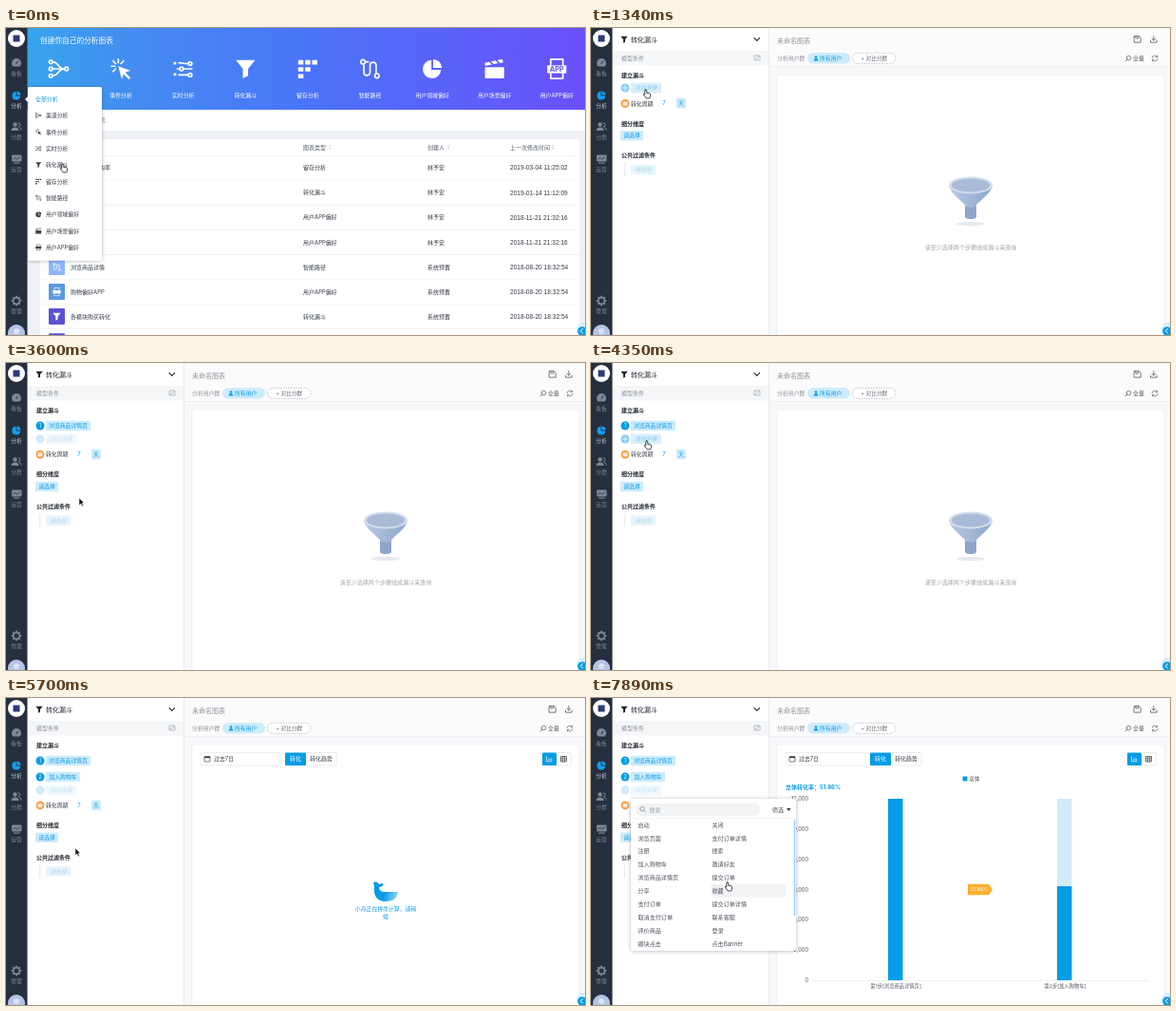
Animation, 610 px wide and 323 px high, one loop 8000 ms. Source, as an HTML page with a canvas:

```html
<!DOCTYPE html>
<html lang="zh-CN">
<head>
<meta charset="utf-8">
<title>转化漏斗</title>
<style>
html,body{margin:0;width:100%;height:100%;overflow:hidden;background:#fff}
canvas{display:block;width:610px;height:323px}
</style>
</head>
<body>
<canvas id="stage"></canvas>
<script>
const W = 610, H = 323, LOOP = 8000;
const BLUE = '#079ce6', CHIP = '#cdebfc', INK = '#333a44', GREY = '#8c929b';
const canvas = document.getElementById('stage');
const g = canvas.getContext('2d');
const dpr = Math.max(1, window.devicePixelRatio || 1);
canvas.width = W * dpr;
canvas.height = H * dpr;

const clamp = v => Math.max(0, Math.min(1, v));
const ramp = (t, a, b) => clamp((t - a) / (b - a));
const ease = u => u * u * (3 - 2 * u);

function text(s, x, y, color = INK, size = 6, style = '', align = 'left', latin = 'Inter') {
  g.font = `${style} ${size}px ${latin}, "Noto Sans CJK SC", "Noto Sans CJK", sans-serif`;
  g.textAlign = align;
  g.fillStyle = color;
  g.fillText(s, x, y + size * .37);
}
function rect(x, y, w, h, fill, r = 0, stroke) {
  g.beginPath();
  g.roundRect(x, y, w, h, r);
  if (fill) { g.fillStyle = fill; g.fill(); }
  if (stroke) { g.strokeStyle = stroke; g.lineWidth = .7; g.stroke(); }
}
function disc(x, y, r, fill) {
  g.beginPath();
  g.arc(x, y, r, 0, 7);
  g.fillStyle = fill;
  g.fill();
}
function path(d, x, y, scale, fill, stroke, lw = 1) {
  const p = new Path2D(d);
  g.save();
  g.translate(x, y);
  g.scale(scale, scale);
  g.lineWidth = lw;
  g.lineCap = g.lineJoin = 'round';
  if (fill) { g.fillStyle = fill; g.fill(p); }
  if (stroke) { g.strokeStyle = stroke; g.stroke(p); }
  g.restore();
}
function faded(alpha, draw) {
  if (alpha <= 0) return;
  g.save();
  g.globalAlpha *= alpha;
  draw();
  g.restore();
}
// White panel; its shadow is kept outside so that it stays clean while fading
function panel(x, y, w, h) {
  g.save();
  g.beginPath();
  g.rect(0, 0, W, H);
  g.roundRect(x, y, w, h, 2);
  g.clip('evenodd');
  g.shadowColor = 'rgba(40,55,80,.38)';
  g.shadowBlur = 4 * dpr;
  g.shadowOffsetY = .6 * dpr;
  rect(x, y, w, h, '#fff', 2);
  g.restore();
  rect(x, y, w, h, '#fff', 2);
}

const ring = (x, y, r) => `M${x - r} ${y}a${r} ${r} 0 1 0 ${2 * r} 0a${r} ${r} 0 1 0 ${-2 * r} 0`;

// Icons on a 24 grid: [fill path, stroke path]
const ICONS = {
  channel: ['', ring(3, 4, 2) + ring(3, 12, 2) + ring(3, 20, 2) + ring(21, 12, 2) + 'M5 4c7 0 6 8 14 8M5 20c7 0 6-8 14-8M5 12h14'],
  event: ['M9 9l14 5-6 2 6 6-2 2-6-6-2 6z', 'M9 1v4M1 9h4M3 3l3 3M15 3l-3 3M3 15l3-3'],
  live: ['M1 4h3v3H1zM1 17h3v3H1z', ring(20, 6, 2) + ring(20, 19, 2) + ring(10, 12, 2) + 'M7 5c5 0 4 1 11 1M12 12h10M7 19h11M5 12h3'],
  funnel: ['M1 2h22l-8 10v8l-6 3V12z', ''],
  retain: ['M1 2h6v5H1zM9 2h6v5H9zM17 2h6v5h-6zM1 10h6v5H1zM9 10h6v5H9zM1 18h6v5H1z', ''],
  route: ['', ring(4, 4, 2.500) + ring(20, 20, 2.500) + 'M5 7v9a3.500 3.500 0 0 0 7 0V8a3.500 3.500 0 0 1 7 0v9M7 4h3'],
  pie: ['M11 2a10.5 10.5 0 1 0 11 11H11zM13 1a10 10 0 0 1 10 10H13z', ''],
  clap: ['M1 10h22v13H1zM1 5l5-1 3 3-8 1.500zM8 3.500l5-1 3 3-5 1zM15 2l6-1 1 3.500-4 .8z', ''],
  app: ['M1 8h22v9H1z', 'M5 8V1h14v7M5 17v6h14v-6']
};
function icon(name, cx, cy, size, color) {
  const [f, s] = ICONS[name], k = size / 24;
  const x = cx - size / 2, y = cy - size / 2;
  path(f, x, y, k, color);
  if (s) path(s, x, y, k, null, color, 1.8);
}

const MODELS = [
  ['channel', '渠道分析'], ['event', '事件分析'], ['live', '实时分析'],
  ['funnel', '转化漏斗'], ['retain', '留存分析'], ['route', '智能路径'],
  ['pie', '用户领域偏好'], ['clap', '用户场景偏好'], ['app', '用户APP偏好']
];
const OWNER = '林予安', PRESET = '系统预置';
const CHARTS = [
  ['首页商品加购率', 'retain', '留存分析', OWNER, '2019-03-04 11:25:02', '#55a5ee'],
  ['购买转化', 'funnel', '转化漏斗', OWNER, '2019-01-14 11:12:09', '#5b52d4'],
  ['应用偏好', 'app', '用户APP偏好', OWNER, '2018-11-21 21:32:16', '#4d90df'],
  ['应用偏好', 'app', '用户APP偏好', OWNER, '2018-11-21 21:32:16', '#4d90df'],
  ['浏览商品详情', 'route', '智能路径', PRESET, '2018-08-20 18:32:54', '#8fb6fa'],
  ['购物偏好APP', 'app', '用户APP偏好', PRESET, '2018-08-20 18:32:54', '#5b9ae2'],
  ['各模块购买转化', 'funnel', '转化漏斗', PRESET, '2018-08-20 18:32:54', '#5b52d4'],
  ['注册转化', 'funnel', '转化漏斗', PRESET, '2018-08-20 18:32:54', '#5b52d4']
];
const EVENTS = [
  ['启动', '关闭'], ['浏览页面', '支付订单详情'], ['注册', '搜索'], ['加入购物车', '邀请好友'],
  ['浏览商品详情页', '提交订单'], ['分享', '收藏'], ['支付订单', '提交订单详情'],
  ['取消支付订单', '联系客服'], ['评价商品', '登录'], ['模块点击', '点击Banner']
];

function sidebar() {
  const back = '#252f3d', grey = '#7d8795';
  rect(0, 0, 22.5, H, back);
  disc(11, 11, 9, '#fff');
  rect(7.5, 7.5, 7, 7, '#2b3a78');
  path('M1.500 9a5 5 0 1 1 7 0z', 6, 31.500, 1, grey);
  path('M5 6l1.500-2.500', 6, 31.500, 1, null, back, 1);
  icon('pie', 11, 71, 10, '#139ff0');
  disc(9.500, 101.500, 2.2, grey);
  path('M0 4a4 3.500 0 0 1 8 0z', 5.500, 104, 1, grey);
  path('M0 0a2 2 0 0 1 0 4M1 5c2 0 2 1.500 2 2.500', 13, 99.800, 1, null, grey, 1);
  rect(6, 133.500, 10.5, 7, grey, 1);
  path('M2 4l2-1.500 2 1.500 3-2', 5.500, 134, 1, null, back, .8);
  rect(8, 141.500, 6.5, 1.2, grey);
  g.save();
  g.translate(11, 287);
  for (let i = 0; i < 8; i++) { g.rotate(Math.PI / 4); rect(-1, -5.200, 2, 2, grey); }
  g.beginPath();
  g.arc(0, 0, 3.2, 0, 7);
  g.strokeStyle = grey; g.lineWidth = 1.4; g.stroke();
  g.restore();
  [['看板', 48], ['分析', 82], ['分群', 115], ['运营', 149], ['管理', 298]].forEach(([s, y]) =>
    text(s, 11, y, s === '分析' ? '#c9d2dc' : grey, 5.7, '', 'center'));
  disc(11, 321, 9, '#b4c4e6');
  disc(11, 319, 3, '#dbe4f5');
}

function helpTab() {
  disc(608, 317, 7.5, '#e3f2fc');
  disc(607, 319, 4.8, BLUE);
  path('M3 0L0 2.500 3 5', 605, 316.500, .9, null, '#fff', 1);
  text('…', 605, 310, BLUE, 5);
}

function sorter(x, y) {
  path('M0 2h3L1.500 0zM0 3.500h3L1.500 5.500z', x, y - 2.7, .8, '#c5cad2');
}

function home() {
  rect(22, 0, 588, H, '#eef1f5');
  const sky = g.createLinearGradient(22, 0, W, 0);
  [[0, '#37a5ee'], [.2, '#458bf1'], [.5, '#4a74f8'], [1, '#6a50fa']].forEach(s => sky.addColorStop(...s));
  rect(22, 0, 588, 86, sky);
  text('创建你自己的分析图表', 36, 13, '#fff', 7.7);
  MODELS.forEach(([name, label], i) => {
    const x = 55.500 + i * 65.6;
    icon(name, x, 43, 22, '#fff');
    if (name === 'app') text('APP', x, 43.500, '#5f58f8', 7.5, 'bold', 'center');
    text(label, x, 70.500, '#fff', 5.9, '', 'center');
  });
  rect(22, 86, 588, 22, '#fff');
  text('我的图表', 81, 97, GREY);
  rect(36, 117, 568, H, '#fff');
  [['图表类型', 313, 340], ['创建人', 444, 465], ['上一次修改时间', 531, 575]].forEach(([s, x, sx]) => {
    text(s, x, 126, '#555c66');
    sorter(sx, 126);
  });
  rect(36, 134.500, 568, .6, '#eceef2');
  CHARTS.forEach(([name, ic, type, who, date, color], i) => {
    const y = 147 + i * 26.1;
    rect(36, y + 13, 568, .6, '#eceef2');
    rect(45, y - 8.500, 17, 17, color, 1);
    icon(ic, 53.500, y, 9, '#fff');
    text(name, 68, y);
    text(type, 313, y);
    text(who, 444, y);
    text(date, 531, y, INK, 6.6, '', 'left', '"Liberation Sans"');
  });
  panel(23, 62, 78, 182.5);
  text('全部分析', 31, 75, BLUE, 5.9);
  MODELS.forEach(([name, label], i) => {
    const y = 92 + i * 17.36;
    icon(name, 34.200, y, 6.5, '#3a414c');
    text(label, 42, y, INK, 5.85);
  });
}

function chip(s, x, y, w, color = BLUE, style = '') {
  rect(x, y - 5.2, w, 10.4, CHIP, 1);
  text(s, x + w / 2, y, color, 5.85, style, 'center');
}
function badge(s, y) {
  disc(36, y, 4.5, BLUE);
  text(s, 36, y, '#fff', 5.5, '', 'center');
}

function builder(steps, hover) {
  rect(22.500, 0, 165, H, '#fff');
  icon('funnel', 35, 12, 8, '#1f252e');
  text('转化漏斗', 42, 12, '#222831', 7);
  path('M0 0l2.800 2.800L5.600 0', 172, 10.5, 1, null, '#333', 1.1);
  rect(22.500, 24, 165, 15.500, '#f5f6f8');
  text('模型条件', 32, 31.500, GREY);
  rect(172, 29, 6, 5, null, .5, '#9aa1ab');
  path('M0 3l4-3', 173, 30, 1, null, '#9aa1ab', .7);
  const head = (s, y) => text(s, 32, y, '#20262e', 6, 'bold');
  head('建立漏斗', 50);
  ['浏览商品详情页', '加入购物车'].slice(0, steps).forEach((s, i) => {
    const y = 66 + i * 17;
    badge(i + 1, y);
    chip(s, 42, y, i ? 36 : 47);
  });
  const ay = 63 + steps * 17, d = steps * 16.7;
  faded(.35 + .6 * hover, () => {
    disc(36, ay, 4.5, '#6bc0f0');
    path('M0 2.500h5M2.500 0v5', 33.500, ay - 2.500, 1, null, '#fff', .9);
    chip('添加步骤', 42, ay, 32, hover > .8 ? '#0a8fd6' : '#7fbfe4', 'italic');
  });
  disc(36, 79.500 + d, 4.5, '#f5a14a');
  rect(34, 78 + d, 4, 3.2, '#fde6cc', .5, '#fff');
  text('转化周期', 42, 79.500 + d, INK, 5.85);
  text('7', 77, 79 + d, BLUE, 6, '', 'center');
  chip('天', 90, 79.300 + d, 10);
  head('细分维度', 100.500 + d);
  chip('请选择', 31, 113.300 + d, 24);
  head('公共过滤条件', 134 + d);
  rect(35.5, 142 + d, .7, 14, '#d5d9df');
  faded(.5, () => chip('请选择', 42, 149 + d, 26, '#7fb9dc', 'italic'));
  rect(187, 0, .8, H, '#e1e4e9');
}

function frameHead() {
  rect(187, 0, 423, H, '#f7f8f9');
  rect(187, 0, 423, 40, '#fbfbfc');
  rect(187, 40, 423, .6, '#e8eaee');
  text('未命名图表', 196, 13, GREY, 7);
  path('M0 0h5l2 2v5H0zM1.500 0v2.500h3V0', 572.500, 8.500, .95, null, '#4a515b', .8);
  path('M3.500 0v4.500M1.500 2.800l2 2 2-2M0 5v2h7V5', 589.500, 8.500, .95, null, '#4a515b', .8);
  text('分析用户群', 196, 32, GREY, 5.9);
  rect(228, 26, 45, 11.500, CHIP, 5.7);
  disc(237, 30.500, 1.3, BLUE);
  path('M0 3a3 3 0 0 1 6 0z', 234.600, 32, .8, BLUE);
  text('所有用户', 241, 32, BLUE, 5.85);
  g.save();
  g.setLineDash([1.5, 1.2]);
  rect(275.500, 26.300, 45.500, 11, '#fff', 5.5, '#a5acb6');
  g.restore();
  text('+ 对比分群', 298.200, 32, '#666d77', 5.7, '', 'center');
  path(ring(4, 2.500, 2.300) + 'M2.300 4.200L.5 6', 562.500, 29, 1, null, '#555', .7);
  text('全量', 571, 32.200, '#555c66', 5.9);
  path('M0 2.500a3 3 0 0 1 5.500-1M5.500 0v1.700H4M6 3.500a3 3 0 0 1-5.500 1M.5 6V4.300H2', 591, 29, 1, null, '#666', .7);
  rect(196, 49, 408, H, '#fff', 1, '#eceef1');
}

function emptyState() {
  g.beginPath();
  g.ellipse(400, 206, 15, 2.2, 0, 0, 7);
  g.fillStyle = '#e6e9ee';
  g.fill();
  const cone = g.createLinearGradient(377, 0, 423, 0);
  cone.addColorStop(0, '#b9c9e2');
  cone.addColorStop(1, '#8da6cc');
  path('M377 165c1 8 9 13 17 21v13c2 2.500 10 2.500 12 0v-13c8-8 16-13 17-21z', 0, 0, 1, cone);
  path('M394 187c3 2 9 2 12 0v12c-2 2.500-10 2.500-12 0z', 0, 0, 1, '#8ea5cc');
  [[23, 9, '#d3dcea'], [20, 7, '#a9bbd7']].forEach(([rx, ry, c]) => {
    g.beginPath();
    g.ellipse(400, 165.500, rx, ry, 0, 0, 7);
    g.fillStyle = c;
    g.fill();
  });
  text('请至少选择两个步骤组成漏斗来查询', 400, 230.500, '#a0a5ad', 6.05, '', 'center');
}

function toolbar() {
  rect(205, 57.500, 84, 13.500, '#fff', 1, '#e3e6ea');
  rect(209, 61.500, 6, 5.5, null, .5, '#444');
  rect(209, 61.500, 6, 1.7, '#444');
  text('过去7日', 219, 64.300, INK, 5.9);
  rect(316, 57.500, 32, 13.500, '#fff', 1, '#dfe3e8');
  rect(294, 57.500, 22, 13.500, BLUE, 1);
  text('转化', 305, 64.300, '#fff', 5.9, '', 'center');
  text('转化趋势', 332, 64.300, INK, 5.9, '', 'center');
  rect(580, 57.500, 15, 13.500, '#fff', 1, '#dfe3e8');
  rect(565, 57.500, 15, 13.500, BLUE, 1);
  path('M0 0v5.500h6M2 4V3M3.700 4V2M5.400 4V2.500', 569.500, 61.500, .95, null, '#fff', .7);
  rect(584.500, 61.500, 6, 5.5, null, 0, '#444');
  path('M0 1.700h6M0 3.600h6M2 0v5.500M4 0v5.500', 584.500, 61.500, 1, null, '#444', .6);
}

function loading() {
  const skin = g.createLinearGradient(392, 206, 413, 210);
  skin.addColorStop(.3, BLUE);
  skin.addColorStop(1, '#9ad6f6');
  path('M387 194c3-1 5 0 6 2 2-1 4-1 5 0-1 2-3 3-5 3 0 4 3 5 7 5h13c0 6-5 10-13 10-9 0-13-6-12-15z', 0, 0, 1, skin);
  text('小舟正在拼命计算，请稍', 400, 221.500, BLUE, 5.85, '', 'center');
  text('候', 400, 230, BLUE, 5.85, '', 'center');
}

function chart(t) {
  const base = 297, full = 191, u = ramp(t, 7300, 7880), p = u * (2 - u);
  rect(391.500, 82.500, 5, 5, BLUE, 1);
  text('总体', 398.500, 85, '#444b55', 5.5);
  text('总体转化率：51.86%', 205, 94, BLUE, 6, 'bold');
  for (let i = 0; i <= 6; i++)
    text((i * 2000).toLocaleString('en-US'), 229, base - i * full / 6, '#555c66', 5.7, '', 'right');
  rect(232, base, 355, .6, '#dfe3e8');
  const bar = (x, part, fill) => rect(x, base - full * part * p, 15.500, full * part * p, fill);
  bar(313, 1, BLUE);
  bar(491, 1, '#d4eaf6');
  bar(491, .5186, BLUE);
  text('第1步[浏览商品详情页]', 321, 303, '#555c66', 5.3, '', 'center');
  text('第2步[加入购物车]', 499.500, 303, '#555c66', 5.3, '', 'center');
  if (t > 7600) {
    path('M0 0h22l4 5.700-4 5.700H0z', 397, 195.800, 1, '#f9b02c');
    text('51.86%', 409, 201.500, '#fff', 5.2, '', 'center');
  }
}

function menu(n, alpha, tip) {
  const y0 = 73 + n * 16.6;
  faded(alpha, () => {
    panel(42, y0, 174, 159.5);
    rect(47, y0 + 4.500, 131.500, 13.500, '#f2f3f5', 6.7);
    path(ring(2.500, 2.500, 2.300) + 'M4.300 4.300L6 6', 51.500, y0 + 8, 1, null, '#8a9099', .8);
    text('搜索', 61.500, y0 + 11.200, '#9da3ab', 6);
    text('筛选', 191, y0 + 11.200, '#444b55', 6);
    path('M0 0h4.500L2.200 3z', 206, y0 + 9.800, 1, '#333');
    rect(42, y0 + 20, 174, .6, '#e6e9ed');
    EVENTS.forEach((row, i) => row.forEach((s, col) => {
      const x = col ? 127.5 : 49.5, y = y0 + 27.200 + i * 13.88;
      const over = Math.abs(tip.y + 2 - y) < 6.94 && (tip.x > 125) === !!col && tip.hand;
      if (over) rect(x - 1, y - 6.700, 78.500, 13.4, '#f1f2f4');
      text(s, x, y, '#4a515b', 6.1);
    }));
    if (alpha > .9) rect(213.700, y0 + 22, 1.6, 101, '#9bd2f6', .8);
  });
}

// [time, x, y, hand]
const TRACK = [
  [0, 58, 143, 1], [420, 58, 143, 0], [700, 58, 138, 0], [1100, 56, 65, 1], [1600, 56, 65, 0],
  [1800, 62, 92, 1], [2200, 75, 142, 1], [2650, 75, 142, 1], [2900, 76, 154, 1], [3200, 76, 154, 0],
  [3500, 77, 142, 0], [3700, 77, 142, 0], [4150, 57, 82, 1], [4420, 57, 82, 0], [4620, 60, 112, 1],
  [5000, 73, 158, 1], [5600, 73, 158, 0], [5850, 73, 158, 0], [6200, 58, 98, 1], [6430, 58, 98, 0],
  [6590, 78, 128, 0], [6720, 84, 136, 1], [7400, 141, 199, 1], [7570, 143, 200, 1], [7850, 142, 194, 1], [8001, 142, 194, 1]
];
function pointer(t) {
  const i = TRACK.findIndex(k => k[0] > t), a = TRACK[i - 1], b = TRACK[i];
  const u = ease(ramp(t, a[0], b[0]));
  return { x: a[1] + (b[1] - a[1]) * u, y: a[2] + (b[2] - a[2]) * u, hand: !!a[3] };
}
function cursor({ x, y, hand }) {
  if (hand)
    path('M2 0c1 0 1.300.500 1.300 1.200V4c2 0 4.500.400 4.500 2 0 2-.500 3-1 4.500H2.500C2 9 0 7.500-.800 6c0-1 1-1 1.700 0V1.200C.900.500 1.200 0 2 0z', x, y, .85, '#fff', '#111', .9);
  else
    path('M0 0v8.500l2-1.800 1.400 3.100 1.500-.700-1.400-3H6z', x, y, .9, '#111', '#fff', .6);
}

// [open start, open end, close start, close end, step count]
const MENUS = [[1450, 1680, 3030, 3300, 0], [4350, 4600, 5370, 5650, 1], [6500, 6720, 9000, 9100, 2]];
const HOVERS = [[1050, 1650], [4050, 4500], [6000, 6720]];
const OPEN = 420, STEPS = [3100, 5420], QUERY = 5650, RESULT = 7200;

function render(t) {
  g.setTransform(dpr, 0, 0, dpr, 0, 0);
  rect(0, 0, W, H, '#fff');
  const tip = pointer(t);
  if (t < OPEN) {
    home();
  } else {
    const steps = STEPS.filter(s => t >= s).length;
    const hover = Math.max(...HOVERS.map(([a, b]) => ramp(t, a, a + 400) * (1 - ramp(t, b - 60, b + 120))));
    frameHead();
    if (t < QUERY) {
      emptyState();
    } else {
      toolbar();
      if (t < RESULT) loading(); else chart(t);
    }
    builder(steps, hover);
    MENUS.forEach(([a, b, c, d, n]) => menu(n, ramp(t, a, b) * (1 - ramp(t, c, d)), tip));
  }
  sidebar();
  if (t < OPEN) path('M3 0v6L0 3z', 20, 72, 1, '#fff');
  helpTab();
  cursor(tip);
}

const start = performance.now();
function tick() {
  render((performance.now() - start) % LOOP);
  requestAnimationFrame(tick);
}
tick();
</script>
</body>
</html>
```
